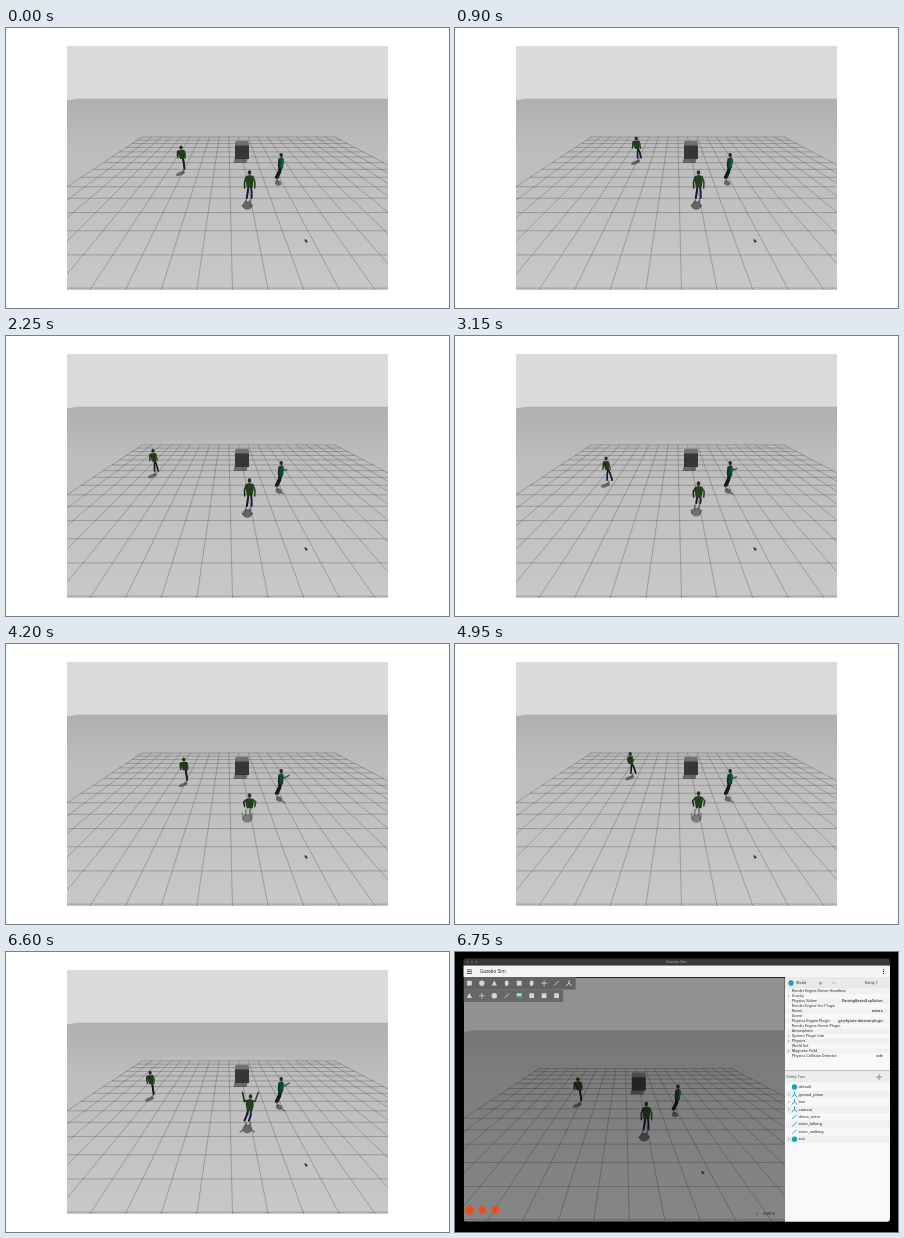
An HTML page with a canvas for the animation above (6900 ms loop, 443 by 280 pixels).

```html
<!DOCTYPE html>
<html lang="en">
<head>
<meta charset="utf-8">
<title>Actor simulation</title>
<style>
html, body { margin: 0; width: 100%; height: 100%; overflow: hidden; background: #fff; }
canvas { display: block; width: 443px; height: 280px; }
</style>
</head>
<body>
<canvas></canvas>
<script>
const W = 443, H = 280, LOOP = 6900, STEP = 150, WINDOW_AT = 6750;
const VIEW = [61, 18, 321, 244];
const SHADOW = 'rgba(55,55,55,.62)';
const canvas = document.querySelector('canvas');
const ctx = canvas.getContext('2d');
const ratio = window.devicePixelRatio || 1;
canvas.width = W * ratio;
canvas.height = H * ratio;
ctx.scale(ratio, ratio);
ctx.lineCap = ctx.lineJoin = 'round';

function rect(x, y, w, h, color) {
  ctx.fillStyle = color;
  ctx.fillRect(x, y, w, h);
}
function trace(points) {
  ctx.beginPath();
  points.forEach(([x, y]) => ctx.lineTo(x, y));
}
function line(color, width, ...points) {
  ctx.strokeStyle = color;
  ctx.lineWidth = width;
  trace(points);
  ctx.stroke();
}
function shape(color, ...points) {
  ctx.fillStyle = color;
  trace(points);
  ctx.fill();
}
function oval(x, y, rx, ry, color, turn = 0) {
  ctx.fillStyle = color;
  ctx.beginPath();
  ctx.ellipse(x, y, rx, ry, turn, 0, 7);
  ctx.fill();
}
function text(s, x, y, size, color = '#333', align = 'left') {
  ctx.font = `${size}px Roboto, "Liberation Sans", sans-serif`;
  ctx.textAlign = align;
  ctx.textBaseline = 'middle';
  ctx.fillStyle = color;
  ctx.fillText(s, x, y);
}
function ease(from, to, t) {
  const k = Math.min(1, Math.max(0, (t - from) / (to - from)));
  return k * k * (3 - 2 * k);
}

function ground() {
  rect(...VIEW, '#dadada');
  const shade = ctx.createLinearGradient(0, 70, 0, 262);
  shade.addColorStop(0, '#afafaf');
  shade.addColorStop(.25, '#bcbcbc');
  shade.addColorStop(1, '#c8c8c8');
  shape(shade, [61, 72.3], [72, 70.7], [382, 70.7], [382, 262], [61, 262]);

  // Grid in perspective: d is the distance below the true horizon.
  const vx = 221.5, vy = 52.3, far = 56.7, near = 215;
  const at = (k, d) => [vx + (.194 + k * .1702) * d, vy + d];
  const ink = 'rgba(70,70,70,.65)';
  for (let k = -10; k <= 10; k++) line(ink, .5, at(k, far), at(k, near));
  for (let row = 0; row <= 14; row++) {
    const d = 1 / (1 / far - row * .000916);
    line(ink, .5, at(-10, d), at(10, d));
  }
}

function props() {
  shape(SHADOW, [229, 129], [242, 129], [240.5, 135], [227.5, 135]);
  rect(229, 116.5, 14, 14.5, '#363636');
  shape('#707070', [229.6, 112.8], [242.4, 112.8], [243.1, 117.6], [228.9, 117.6]);
  shape('#444', [298, 211.8], [300, 211.3], [302, 213.5], [300, 215]);
}

// Lap corners: [share of the lap, x, y]
const LAP = 3800;
const corners = [[0, 175, 119], [.25, 181.5, 109.5], [.48, 154, 109.5],
  [.68, 141.5, 118], [.8, 147, 122.5], [1, 175, 119]];

function walker(t) {
  const u = t % LAP / LAP;
  const i = corners.findIndex(c => c[0] > u);
  const [u0, x0, y0] = corners[i - 1], [u1, x1, y1] = corners[i];
  const k = (u - u0) / (u1 - u0);
  const x = x0 + (x1 - x0) * k, y = y0 + (y1 - y0) * k;
  const side = Math.abs(x1 - x0) / Math.hypot(x1 - x0, 2 * (y1 - y0));
  const size = 1 + (y - 110) * .01;
  const at = (dx, dy) => [x + dx * size, y + dy * size];
  const swing = Math.cos((t - 5700) / 1200 * Math.PI * 2) * (1 + 2.4 * side);
  const w = 3.6 - 1.4 * side;

  oval(...at(-.5, 24.5), 4.8, 1.7, SHADOW, -.35);
  line(SHADOW, 1.2, at(1, 23.5), at(3, 20.5));
  for (const s of [-1, 1])
    line('#171a2e', 1.7, at(1.8, 10), at(2.5 + s * swing * .6, 14.5), at(3.2 + s * swing, 19.8));
  shape('#213a1c', at(-w, 3), at(w, 2.6), at(w + .8, 6), at(w, 11), at(.3 - w / 3, 11), at(-w, 6));
  line('#172a18', 1.3, at(-w, 4), at(-w - .3, 7), at(-w + .4 - swing * .4, 10));
  line('#2b4a20', 1.3, at(w, 4), at(w + .8, 7), at(w + .6 + swing * .4, 10.3));
  oval(x, y + .6, 1.6, 2, '#2a2a1d');
}

function talker(t) {
  const out = ease(1050, 1350, t) * (.8 + .18 * Math.sin(t / 200));
  oval(272 + out, 155, 3.2, 2.5, SHADOW, .3);
  line(SHADOW, 1.2, [274, 156], [275 + out * 4, 156 + out * 3]);
  line(SHADOW, 1.3, [270, 150], [272, 154]);
  line('#111416', 2, [274, 139], [272.5, 144], [269.8, 149.5]);
  line('#17191c', 2, [275.2, 139], [274.2, 144], [271.6, 149.8]);
  shape('#124535', [272.4, 130.5], [276, 129], [278, 131.5], [277, 140.2], [272.8, 140.2]);
  line('#0c2b25', 1.4, [273.2, 132], [272.4, 137], [273, 140]);
  line('#156552', 1.4, [276.7, 131.3], [277 + out, 134.5 - out * .5], [276 + 7.5 * out, 138 - 7 * out]);
  oval(275.2, 127, 1.7, 2.1, '#20291f');
}

function exerciser(t) {
  const drop = ease(2250, 4200, t) - ease(4200, 6300, t);
  const tuck = ease(2250, 4200, t) - .8 * ease(5700, 6600, t);
  const raise = ease(5850, 6600, t);
  const x = 243.7, head = 144.5 + 7 * drop, top = head + 3;
  const hip = 159 + 4.5 * drop - raise, foot = 170 - 6.5 * tuck;
  const elbow = [5.2 + .8 * tuck, 154 + 4 * drop - 4.5 * raise];
  const hand = [5 + 2.8 * raise, 160 + 2.5 * drop - 19.5 * raise];

  // Shadow: torso patch, then arms and legs around it.
  const tone = `rgba(65,65,65,${.72 - tuck * .2})`;
  const sy = 177.5 - tuck * 3;
  oval(241.3, sy, 4.8, 4.3, tone);
  for (const s of [-1, 1]) {
    line(tone, 1.6, [241.5 + s * 2, sy - 3], [242.3 + s * 2.2, foot + 2]);
    line(tone, 1.5, [241.3 + s * 4, sy + 1], [241.3 + s * (5 + 2 * raise), sy - 5 * tuck + 4 * raise]);
    line(s < 0 ? '#141732' : '#191d42', 2, [x + s * 1.3, hip - .5],
      [x - raise + s * 2, (hip + foot) / 2], [x - .5 - 2.5 * raise + s * (2.4 - tuck), foot]);
  }
  shape('#22401c', [x - 3.8, top + .5], [x, top - .6], [x + 3.8, top + .5],
    [x + 4, top + 5], [x + 2.9, hip + .5], [x - 2.9, hip + .5], [x - 4, top + 5]);
  for (const s of [-1, 1])
    line(s < 0 ? '#172d17' : '#294920', 1.6, [x + s * 3.4, top + 1.5],
      [x + s * elbow[0], elbow[1]], [x + .7 * raise + s * hand[0], hand[1]]);
  oval(x - .2 + raise, head, 1.8, 2.3, '#302f23');
}

function scene(t) {
  ctx.save();
  ctx.beginPath();
  ctx.rect(...VIEW);
  ctx.clip();
  ground();
  props();
  walker(t);
  talker(t);
  exerciser(t);
  ctx.restore();
}

// A leading ">" marks a row that can be opened; "=" splits name and value.
const PROPERTIES = ['Render Engine Server Headless', '>Gravity', 'Physics Solver=DantzigBoxedLcpSolver',
  'Render Engine Gui Plugin', 'Name=actors', 'Scene', 'Physics Engine Plugin=gz-physics-dartsim-plugin',
  'Render Engine Server Plugin', 'Atmosphere', '>System Plugin Info', '>Physics', 'World Set',
  '>Magnetic Field', 'Physics Collision Detector=ode'];
const ENTITIES = ['default', '>ground_plane', '>box', '>camera', 'demo_actor',
  'actor_talking', 'actor_walking', '>sun'];
const BLUE = '#1a9fc4';

const icons = {
  box: (x, y, c) => rect(x - 2.4, y - 2.4, 4.8, 4.8, c),
  ball: (x, y, c) => oval(x, y, 2.7, 2.7, c),
  tall: (x, y, c) => oval(x, y, 1.9, 2.8, c),
  cone: (x, y, c) => shape(c, [x, y - 2.8], [x + 2.6, y + 2.4], [x - 2.6, y + 2.4]),
  plus: (x, y, c) => { line(c, .8, [x - 2.6, y], [x + 2.6, y]); line(c, .8, [x, y - 2.6], [x, y + 2.6]); },
  slash: (x, y, c) => line(c, .9, [x - 2, y + 2], [x + 2, y - 2]),
  axes: (x, y, c) => {
    line(c, 1, [x, y - 2.5], [x, y], [x - 2.5, y + 2.3]);
    line(c, 1, [x, y], [x + 2.5, y + 2.3]);
  },
  open: (x, y, c) => line(c, .5, [x - .5, y - 1], [x + .5, y], [x - .5, y + 1])
};

function toolbars() {
  const rows = ['box ball cone tall box tall plus slash axes', 'cone plus ball slash box box box box'];
  rows.forEach((row, r) => {
    const names = row.split(' ');
    rect(8.5, 25 + r * 12.5, names.length * 12.45, 12.5, r ? '#686868' : '#626262');
    names.forEach((name, i) => icons[name](14.4 + i * 12.45, 31.2 + r * 12.5, '#d4d4d4'));
  });
  rect(62, 44, 4.8, 2, BLUE);
}

function properties() {
  rect(330, 25, 105, 245, '#f8f8f8');
  rect(330, 25, 105, 11.5, '#e9e9e9');
  icons.ball(336, 31, BLUE);
  text('World', 341, 31, 4);
  text('Entity 1', 423, 31, 4, '#333', 'right');
  rect(364, 30, 3, 2.5, '#aaa');
  line('#aaa', .7, [377, 31], [381, 31]);
  PROPERTIES.forEach((row, i) => {
    const y = 39.3 + i * 4.98;
    const [name, value] = row.replace('>', '').split('=');
    if (i % 2 === 0) rect(331, y - 2.5, 104, 5, '#f0f0f0');
    text(name, 336.8, y, 3.9);
    if (value) text(value, 427.7, y, 3.9, '#111', 'right');
    if (row[0] === '>') icons.open(333.5, y, '#555');
  });
}

function entities() {
  rect(330, 118, 105, 1.4, '#c4c4c4');
  rect(330, 119.4, 105, 11, '#ececec');
  text('Entity Tree', 331.5, 125, 4, '#555');
  icons.plus(424, 125, '#777');
  ENTITIES.forEach((row, i) => {
    const y = 135 + i * 7.45, opens = row[0] === '>';
    if (i % 2) rect(331, y - 3.7, 104, 7.4, '#f0f0f0');
    if (opens) icons.open(334, y, '#666');
    const icon = i % 7 === 0 ? 'ball' : opens ? 'axes' : 'slash';
    icons[icon](339.5, y, BLUE);
    text(row.replace('>', ''), 343.5, y, 4.1);
  });
}

function appWindow() {
  rect(0, 0, W, H, '#000');
  ctx.save();
  ctx.beginPath();
  ctx.roundRect(8.5, 6.5, 426.5, 263.2, 3);
  ctx.clip();
  ctx.save();
  ctx.translate(-52.2, 7.6);
  scene(0);
  ctx.globalCompositeOperation = 'multiply';
  rect(...VIEW, '#aaa');
  ctx.restore();

  rect(8, 6, 428, 7.5, '#393939');
  rect(8, 13.5, 428, 11.5, '#f5f5f5');
  text('Gazebo Sim', 221.5, 10, 3.8, '#aaa', 'center');
  text('Gazebo Sim', 25, 19.5, 4.8);
  for (let i = 0; i < 3; i++) {
    oval(12.5 + i * 4.5, 10, 1.1, 1.1, '#626262');
    rect(12, 17.5 + i * 1.8, 5, .8, '#333');
    oval(428.5, 17.6 + i * 1.9, .65, .65, '#333');
    oval(14.5 + i * 12.9, 258, i ? 4 : 4.8, i ? 4 : 4.8, '#e6532b');
    icons.open(14.5 + i * 12.9, 258, '#8c2b15');
  }
  toolbars();
  properties();
  entities();
  icons.open(302, 262, '#222');
  text('0.00 %', 320, 262, 4, '#111', 'right');
  ctx.restore();
}

function draw(now) {
  const t = Math.floor(now % LOOP / STEP) * STEP;
  if (t >= WINDOW_AT) return appWindow();
  rect(0, 0, W, H, '#fff');
  scene(t);
}

let start;
function tick(now) {
  start ??= now;
  draw(now - start);
  requestAnimationFrame(tick);
}
draw(0);
requestAnimationFrame(tick);
</script>
</body>
</html>
```
